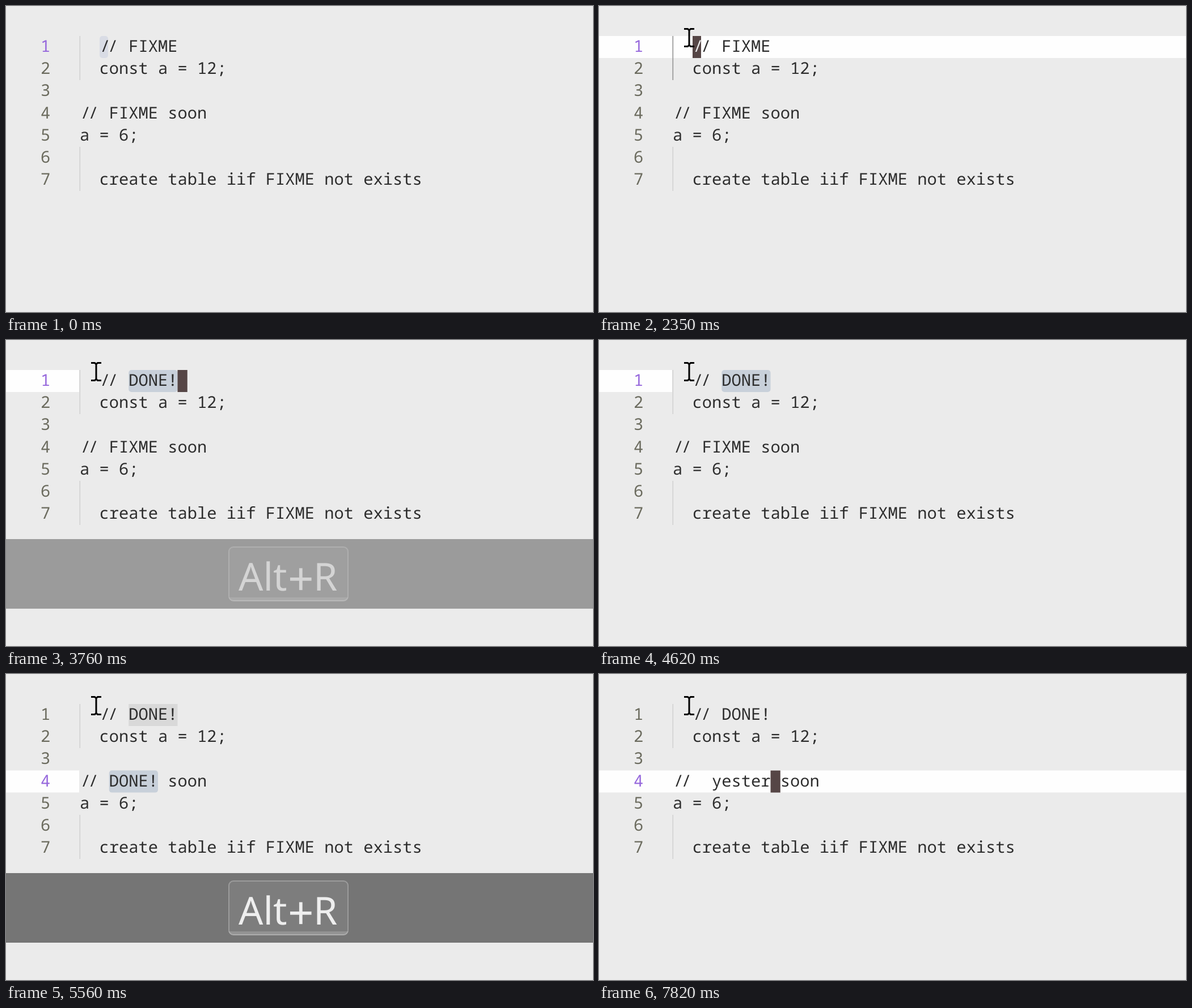
Write an HTML page with a canvas that moves like this. It is 1035 px wide and 541 px high and loops after 8 s.

```html
<!DOCTYPE html>
<html lang="en">
<head>
<meta charset="utf-8">
<title>Editor replace</title>
<style>
  html, body { margin: 0; width: 100%; height: 100%; overflow: hidden; background: #ebebeb; }
  canvas { display: block; }
</style>
</head>
<body>
<canvas id="stage" width="1035" height="541"></canvas>
<script>
const ctx = document.getElementById('stage').getContext('2d');
const W = 1035, H = 541, LOOP = 8000;
const LEFT = 130, TOP = 53, COL = 17.25, ROW = 39.2;
const MONO = '28.75px "Noto Sans Mono", monospace';
const INK = '#2d2d2d', BG = '#ebebeb', BLOCK = '#564646';

const colX = c => LEFT + c * COL;
const rowY = r => TOP + r * ROW;

// Latest [time, ...value] entry that has been reached.
const latest = (keys, t) => keys.filter(k => k[0] <= t).pop();

const glide = [
  [80, 511, 480], [234, 344, 263], [388, 215, 91], [542, 130, 64],
  [850, 111, 63], [927, 108, 69], [1312, 124, 72], [1697, 165, 69]
];
const hops = [
  [1697, 165, 69], [1850, 168, 60], [1930, 172, 64], [2020, 175, 69],
  [2170, 170, 64], [2260, 164, 60], [2350, 159, 56]
];
const blink = [
  [0, 0], [1850, 1], [2520, 0], [2970, 1], [3450, 0], [3680, 1], [4140, 0],
  [4690, 1], [5560, 0], [6110, 1]
];
const overlay = [
  [0, 0], [3680, 0.35], [3760, 0.68], [3830, 1], [4620, 0],
  [5090, 0.35], [5160, 0.68], [5250, 1], [6110, 0]
];
const typing = [
  [6260, ' '], [6720, ' y'], [6950, ' ye'], [7120, ' yes'],
  [7440, ' yest'], [7750, ' yeste'], [7820, ' yester']
];

function pointerAt(t) {
  if (t < 80) return null;
  if (t >= 1697) return latest(hops, t).slice(1);
  const s = 80 + Math.floor((t - 80) / 77) * 77;
  const i = glide.findIndex(k => k[0] > s);
  const a = glide[i - 1], b = glide[i];
  const f = (s - a[0]) / (b[0] - a[0]);
  return [a[1] + (b[1] - a[1]) * f, a[2] + (b[2] - a[2]) * f];
}

function rect(x, y, w, h, color, radius = 0) {
  ctx.fillStyle = color;
  ctx.beginPath();
  ctx.roundRect(x, y, w, h, radius);
  ctx.fill();
}

function stroke(color, width) {
  ctx.strokeStyle = color;
  ctx.lineWidth = width;
  ctx.stroke();
}

const mark = (row, col, len, color, radius) =>
  rect(colX(col), rowY(row), len * COL, 39, color, radius);

function code(row, col, text, color = INK) {
  ctx.font = MONO;
  ctx.fillStyle = color;
  const y = rowY(row) + 28;
  if (text.startsWith('//')) {
    // The two slashes sit closer together, like a ligature.
    ctx.fillText('/', colX(col) + 1.7, y);
    ctx.fillText('/', colX(col + 1) - 1.7, y);
    text = text.slice(2);
    col += 2;
  }
  ctx.fillText(text, colX(col), y);
}

function chevron(t) {
  const alpha = Math.min((t - 400) / 450, (1697 - t) / 400, 1);
  if (alpha <= 0) return;
  ctx.globalAlpha = alpha;
  ctx.beginPath();
  ctx.moveTo(101, 227);
  ctx.lineTo(108, 234);
  ctx.lineTo(115, 227);
  stroke('#8a8a8a', 1.6);
  ctx.globalAlpha = 1;
}

function pointer(x, y) {
  ctx.beginPath();
  for (const s of [-1, 1]) {
    const end = y + s * 15.5;
    ctx.moveTo(x - 9, end);
    ctx.lineTo(x - 2.5, end);
    ctx.lineTo(x, end - s * 2.5);
    ctx.lineTo(x + 2.5, end);
    ctx.lineTo(x + 9, end);
  }
  ctx.moveTo(x, y - 14);
  ctx.lineTo(x, y + 14);
  stroke('#000', 3);
}

function keyBanner(alpha) {
  if (!alpha) return;
  ctx.globalAlpha = alpha;
  rect(0, 352, W, 123, 'rgba(0,0,0,0.5)');
  rect(392, 365, 212, 97, 'rgba(255,255,255,0.06)', 9);
  ctx.save();
  ctx.beginPath();
  ctx.roundRect(392, 365, 212, 97, 9);
  ctx.roundRect(393, 355, 210, 100, 8);
  ctx.clip('evenodd');
  rect(392, 455, 212, 7, 'rgba(255,255,255,0.17)');
  ctx.restore();
  ctx.beginPath();
  ctx.roundRect(393, 366, 210, 95, 8);
  stroke('rgba(255,255,255,0.24)', 2);
  ctx.fillStyle = '#eee';
  ctx.font = '68px "Noto Sans", sans-serif';
  ctx.fillText('Alt', 410, 443);
  ctx.fillText('R', 542, 443);
  ctx.font = '80px "Noto Sans", sans-serif';
  ctx.fillText('+', 497, 451);
  ctx.globalAlpha = 1;
}

function draw(t) {
  const focused = t >= 1850;
  const first = t >= 3680, second = t >= 5090;
  const typed = t >= 6260 ? latest(typing, t)[1] : null;
  const selecting = first && typed === null;
  const active = second ? 3 : 0;

  rect(0, 0, W, H, BG);
  if (focused) rect(0, rowY(active), selecting ? 129 : W, 39, '#fefefe');

  const guide = focused && !first ? '#929292' : '#d0d0d0';
  rect(129.5, TOP, 1.6, 78, guide);
  rect(129.5, rowY(5), 1.6, 78, '#d0d0d0');

  if (!focused) rect(165, TOP, 15, 39, '#d9dce5', 5);
  if (selecting) {
    if (t >= 5250) mark(0, 5, 5, '#d9d9d9');
    mark(active, second ? 3 : 5, 5, '#c8d0da', 5);
  }

  for (let i = 0; i < 7; i++) {
    code(i, -4, String(i + 1), i === active ? '#9668dc' : '#6b6b5e');
  }
  const word = typed ?? (second ? 'DONE!' : 'FIXME');
  code(0, 2, first ? '// DONE!' : '// FIXME');
  code(1, 2, 'const a = 12;');
  code(3, 0, '// ' + word + ' soon');
  code(4, 0, 'a = 6;');
  code(6, 2, 'create table iif FIXME not exists');

  if (latest(blink, t)[1]) {
    if (!first) {
      rect(165, TOP, 15, 39, BLOCK);
      ctx.fillStyle = BG;
      ctx.font = MONO;
      ctx.fillText('/', colX(2) + 1.7, TOP + 28);
    } else {
      mark(active, second ? 3 + word.length : 10, 1, BLOCK);
    }
  }

  chevron(t);
  keyBanner(latest(overlay, t)[1]);
  const at = pointerAt(t);
  if (at) pointer(...at);
}

ctx.textRendering = 'geometricPrecision';
const start = performance.now();
function tick() {
  draw((performance.now() - start) % LOOP);
  requestAnimationFrame(tick);
}
tick();
</script>
</body>
</html>
```
